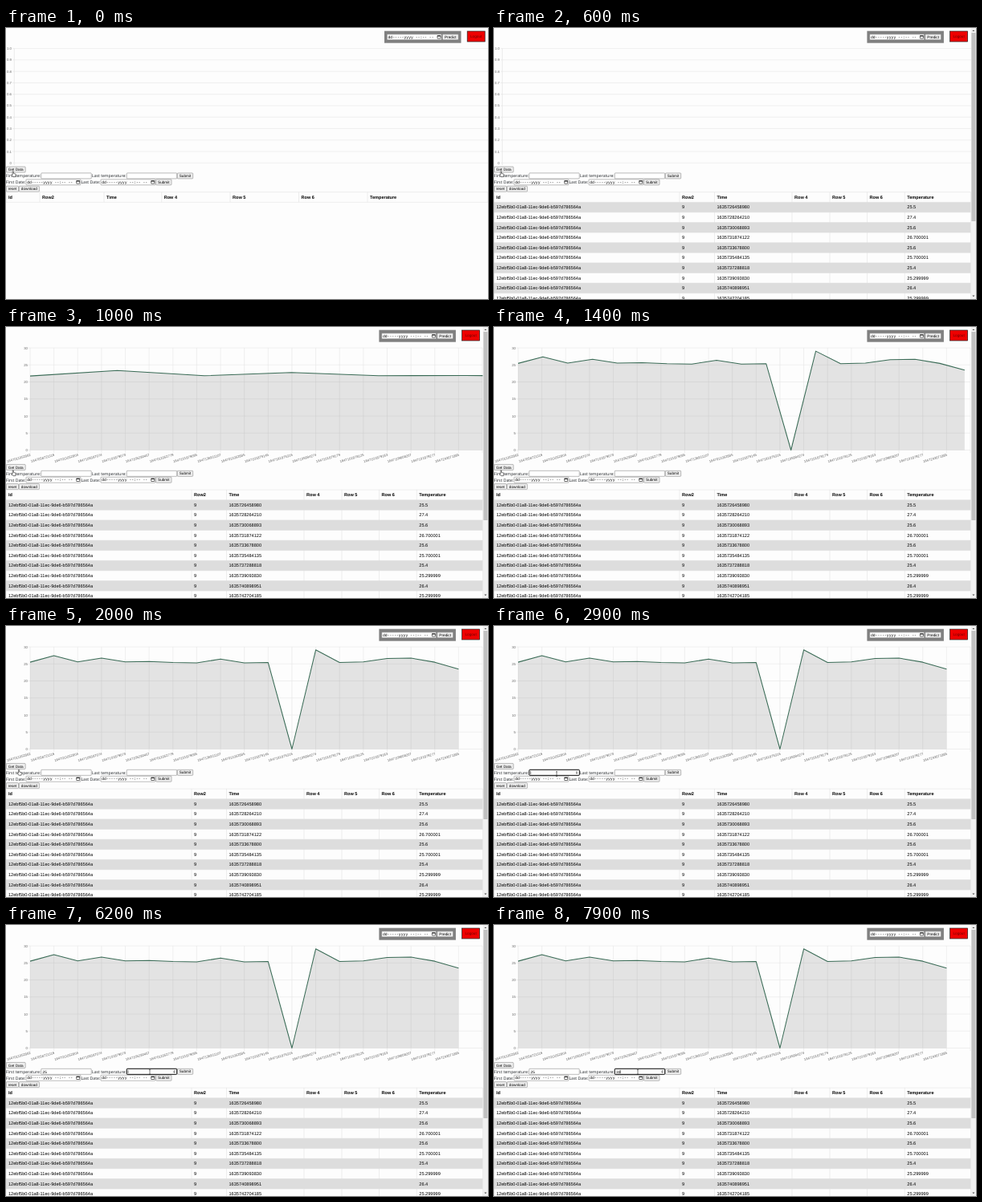
These frames come from a looping animation (600x338 px, 8000 ms). An HTML page:

```html
<!DOCTYPE html>
<html lang="en">
<head>
<meta charset="utf-8">
<title>Temperature data</title>
<style>
  html, body { margin: 0; width: 100%; height: 100%; overflow: hidden; background: #fdfdfd; }
  svg { display: block; width: 100vw; height: 100vh; }
  text { font: 4.69px "Liberation Sans", Arial, sans-serif; fill: #000; text-rendering: geometricPrecision; white-space: pre; }
  .label { font: 5.15px "Open Sans", "Noto Sans", sans-serif; fill: #212529; }
  .cell { font-size: 5.62px; }
  .head { font-size: 5.55px; font-weight: 700; }
  .date { font: 4.75px "Liberation Mono", monospace; }
  .tick { font-size: 4.3px; fill: #666; text-anchor: end; }
  .mid { text-anchor: middle; }
</style>
</head>
<body>
<svg id="stage" viewBox="0 0 600 338" preserveAspectRatio="none"></svg>
<script>
const LOOP = 8000, STEP = 100;
const LOADED = 600, CHARTED = 700, GROW_START = 620, GROW_TIME = 1000;
const CHART = { left: 30, right: 593, top: 26, bottom: 153.5, max: 30 };
const gap = (CHART.right - CHART.left) / 19;

const temps = [25.5, 27.4, 25.6, 26.7, 25.6, 25.7, 25.4, 25.3, 26.4, 25.3, 25.4, 0,
  29.1, 25.4, 25.6, 26.6, 26.7, 25.5, 23.5];
const stamps = `1647011052882 1647058721116 1647011052904 1647105587074 1647101879070
  1647105280457 1647011052779 1647101879095 1647136911107 1647011052885 1647101879145
  1647181875316 1647105994274 1647101879179 1647101878125 1647101879183 1647109608207
  1647101879277 1647243071985`.split(/\s+/);
const records = `1635726458980 25.5|1635728264210 27.4|1635730068893 25.6|1635731874122 26.700001
1635733678800 25.6|1635735484135 25.700001|1635737288818 25.4|1635739093830 25.299999
1635740898951 26.4|1635742704185 25.299999`.split(/[|\n]/).map(r => r.split(' '));
const heads = ['Id', 'Row2', 'Time', 'Row 4', 'Row 5', 'Row 6', 'Temperature'];

const rect = (x, y, w, h, fill, stroke = 'none', r = 0, sw = .5) =>
  `<rect x="${x}" y="${y}" width="${w}" height="${h}" rx="${r}" fill="${fill}" stroke="${stroke}" stroke-width="${sw}"/>`;
const text = (x, y, s, cls = '', more = '') => `<text x="${x}" y="${y}" class="${cls}" ${more}>${s}</text>`;
const line = (x1, y1, x2, y2, color = '#e4e4e4', w = .55) =>
  `<path d="M${x1} ${y1}L${x2} ${y2}" stroke="${color}" stroke-width="${w}"/>`;
const group = (id, body) => `<g id="${id}">${body}</g>`;
const range = n => [...Array(n).keys()];

const button = (x, y, w, s) =>
  rect(x + .3, y, w - .6, 7, '#efefef', '#767676', .8) + text(x + w / 2, y + 5.2, s, 'mid');
const field = (x, y, w) => rect(x + .3, y, w - .6, 7, '#fff', '#767676', .6);
const dateField = (x, y) => field(x, y, 68.5) + text(x + 1.5, y + 5, 'dd-----yyyy --:-- --', 'date') +
  rect(x + 63, y + 2, 4, 3.3, '#fff', '#111', .3, .6) + line(x + 62.8, y + 2.1, x + 67.2, y + 2.1, '#111', 1);

function topBar() {
  return rect(471, 3.7, 95.5, 15, '#808080') + dateField(474, 7.8) + button(543, 7.8, 20.5, 'Predict') +
    rect(574.2, 4, 22, 13, '#ee0000', '#222', 0, .7) + text(585.2, 12.2, 'Logout', 'mid', 'style="fill:#720000"');
}

function form() {
  return button(0, 173, 24.5, 'Get Data') +
    text(0, 186.3, 'First temperature:', 'label') + field(43.5, 180.9, 63) +
    text(107, 186.3, 'Last temperature:', 'label') + field(150, 180.9, 63) + button(213, 180.9, 20, 'Submit') +
    text(0, 194.2, 'First Date:', 'label') + dateField(24.7, 188.8) +
    text(93.4, 194.2, 'Last Date:', 'label') + dateField(117.7, 188.8) + button(186.3, 188.8, 20, 'Submit') +
    button(0, 197.2, 15.8, 'reset') + button(16, 197.2, 25.7, 'download');
}

function table(edges, rows) {
  const top = 204.7, h = 12.6, right = edges[edges.length - 1];
  const baseline = i => top + h * i + 8.1;
  let out = '';
  rows.forEach((r, i) => {
    const y = top + h * (i + 1);
    if (i % 2 === 0) out += rect(0, y, right, h, '#dddddd');
    const cells = ['12ebf5b0-01a8-11ec-9de6-b597d786564a', '9', r[0], '', '', '', r[1]];
    cells.forEach((s, c) => { if (s) out += text(edges[c] + 3, baseline(i + 1), s, 'cell'); });
  });
  range(rows.length + 2).forEach(i => out += line(0, top + h * i, right, top + h * i, '#ddd', .5));
  edges.forEach(x => out += line(x, top, x, top + h * (rows.length + 1), '#ddd', .5));
  heads.forEach((s, c) => out += text(edges[c] + 3, baseline(0), s, 'head'));
  return out;
}

function emptyAxes() {
  return range(11).map(i => {
    const y = 168.3 - i * 14.27;
    return line(8, y, 600, y) + text(7, y + 1.5, i ? (i / 10).toFixed(1) : '0', 'tick');
  }).join('') + line(10.3, 25.6, 10.3, 171, '#dcdcdc');
}

function dataAxes() {
  const { left, right, top, bottom } = CHART;
  const levels = range(7).map(i => {
    const y = bottom - i * (bottom - top) / 6;
    return line(left - 3, y, right, y) + text(left - 3, y + 1.5, i * 5, 'tick');
  });
  const columns = range(20).map(i => line(left + i * gap, top, left + i * gap, bottom + 3.5));
  const names = stamps.map((s, i) =>
    text(0, 0, s, 'tick', `transform="translate(${left + i * gap + 1} 160.7) rotate(-16)"`));
  return [...levels, ...columns, ...names].join('');
}

const scrollbar = rect(593.8, 0, 6.2, 338, '#f1f1f1') + rect(594.4, 6, 5, 235, '#c1c1c1') +
  '<path d="M595.4 4l1.5-1.6 1.5 1.6z" fill="#505050"/><path d="M595.4 333.6l1.5 1.6 1.5-1.6z" fill="#505050"/>';

const hand = '<path d="M-.6 0q.6-.8 1.2 0v2.4l2.3.6q.7.3.6 1l-.5 2.6h-3l-1.9-2.6q.2-.9 1.3-.2z" fill="#fff" stroke="#111" stroke-width=".55"/>';
const beam = '<path d="M-1.1-2.8h2.2M0-2.8v5.6M-1.1 2.8h2.2" fill="none" stroke="#222" stroke-width=".6"/>';

const focusBox = rect(.3, 179.3, 62.4, 7, '#fff', '#111', .8, 1) +
  '<path d="M58.2 182.4l1.2-1.5 1.2 1.5zM58.2 183.3l1.2 1.5 1.2-1.5z" fill="#555"/>';

const stage = document.getElementById('stage');
stage.innerHTML = `<defs><clipPath id="plot">${rect(29.5, 20, 564, 134.2, '#000')}</clipPath></defs>` +
  rect(0, 0, 600, 338, '#fdfdfd') +
  group('blank', emptyAxes()) +
  group('chart', dataAxes() + `<g clip-path="url(#plot)"><path id="area" fill="#000" fill-opacity=".1"/>
    <path id="curve" fill="none" stroke="#3a6b56" stroke-width="1.05" stroke-linejoin="round"/></g>`) +
  group('bar', topBar()) +
  group('body', form() +
    group('emptyTable', table([0, 42, 122, 193.7, 279, 364.5, 450, 600], [])) +
    group('fullTable', table([0, 231, 274.5, 371, 418, 464.5, 511.3, 593.5], records))) +
  group('scroll', scrollbar) +
  group('focus', focusBox) +
  text(45.6, 184.7, '', '', 'id="first"') + text(152.1, 184.7, '', '', 'id="last"') +
  group('caret', line(0, 180.9, 0, 185.2, '#000', .5)) +
  group('hand', hand) + group('beam', beam);

const parts = {};
stage.querySelectorAll('[id]').forEach(el => parts[el.id] = el);
const show = (name, on) => parts[name].setAttribute('display', on ? 'inline' : 'none');
const move = (name, x, y) => parts[name].setAttribute('transform', `translate(${x} ${y})`);

// time, x, y of the pointer
const pointerPath = [[0, 8.8, 179], [1900, 8.8, 179], [2400, 78, 184.5], [5000, 78, 184.5], [5600, 179, 183.5], [LOOP, 179, 183.5]];
const typing = {
  first: [[3700, '2'], [4200, '25']],
  last: [[7200, '3'], [7500, '30']]
};
const FOCUS_FIRST = 2500, FOCUS_LAST = 5800;

function pointerAt(t) {
  const i = pointerPath.findIndex(p => p[0] > t);
  const [a, b] = [pointerPath[i - 1], pointerPath[i]];
  const u = (t - a[0]) / (b[0] - a[0]), e = u * u * (3 - 2 * u);
  return [a[1] + (b[1] - a[1]) * e, a[2] + (b[2] - a[2]) * e];
}

function drawCurve(t) {
  const { left, right, bottom, top, max } = CHART;
  const u = Math.min(1, Math.max(0, (t - GROW_START) / GROW_TIME));
  const grown = 1 - (1 - u) ** 4;
  const spread = gap + (right - left - gap) * (1 - grown);
  const points = temps.map((v, i) =>
    `${(left + i * spread).toFixed(2)} ${(bottom - v * grown * (bottom - top) / max).toFixed(2)}`);
  const path = 'M' + points.join('L');
  parts.curve.setAttribute('d', path);
  parts.area.setAttribute('d', `${path}V${bottom}H${left}Z`);
}

function render(t) {
  const loaded = t >= LOADED, charted = t >= CHARTED;
  show('blank', !charted);
  show('chart', charted);
  show('emptyTable', !loaded);
  show('fullTable', loaded);
  show('scroll', loaded);
  move('bar', loaded ? -6.6 : 0, 0);
  move('body', 0, charted ? -1.6 : 0);
  if (charted) drawCurve(t);

  let active = null, since = 0;
  if (t >= FOCUS_FIRST) [active, since] = ['first', FOCUS_FIRST];
  if (t >= FOCUS_LAST) [active, since] = ['last', FOCUS_LAST];
  for (const name in typing) {
    const typed = typing[name].filter(k => k[0] <= t).pop();
    parts[name].textContent = typed ? typed[1] : '';
    if (name === active && typed) since = typed[0];
  }
  show('focus', active);
  show('caret', active && Math.floor((t - since) / 530) % 2 === 0);
  if (active) {
    const x = active === 'first' ? 43.6 : 150;
    move('focus', x, 0);
    move('caret', x + 2.1 + parts[active].textContent.length * 2.61, 0);
  }

  const [x, y] = pointerAt(t);
  const inField = x > 43.5 && x < 106.5 || x > 150;
  show('hand', !inField);
  show('beam', inField);
  move(inField ? 'beam' : 'hand', x, y);
}

function frame() {
  const t = performance.now() % LOOP;
  render(Math.floor(t / STEP) * STEP);
  requestAnimationFrame(frame);
}
frame();
</script>
</body>
</html>
```
